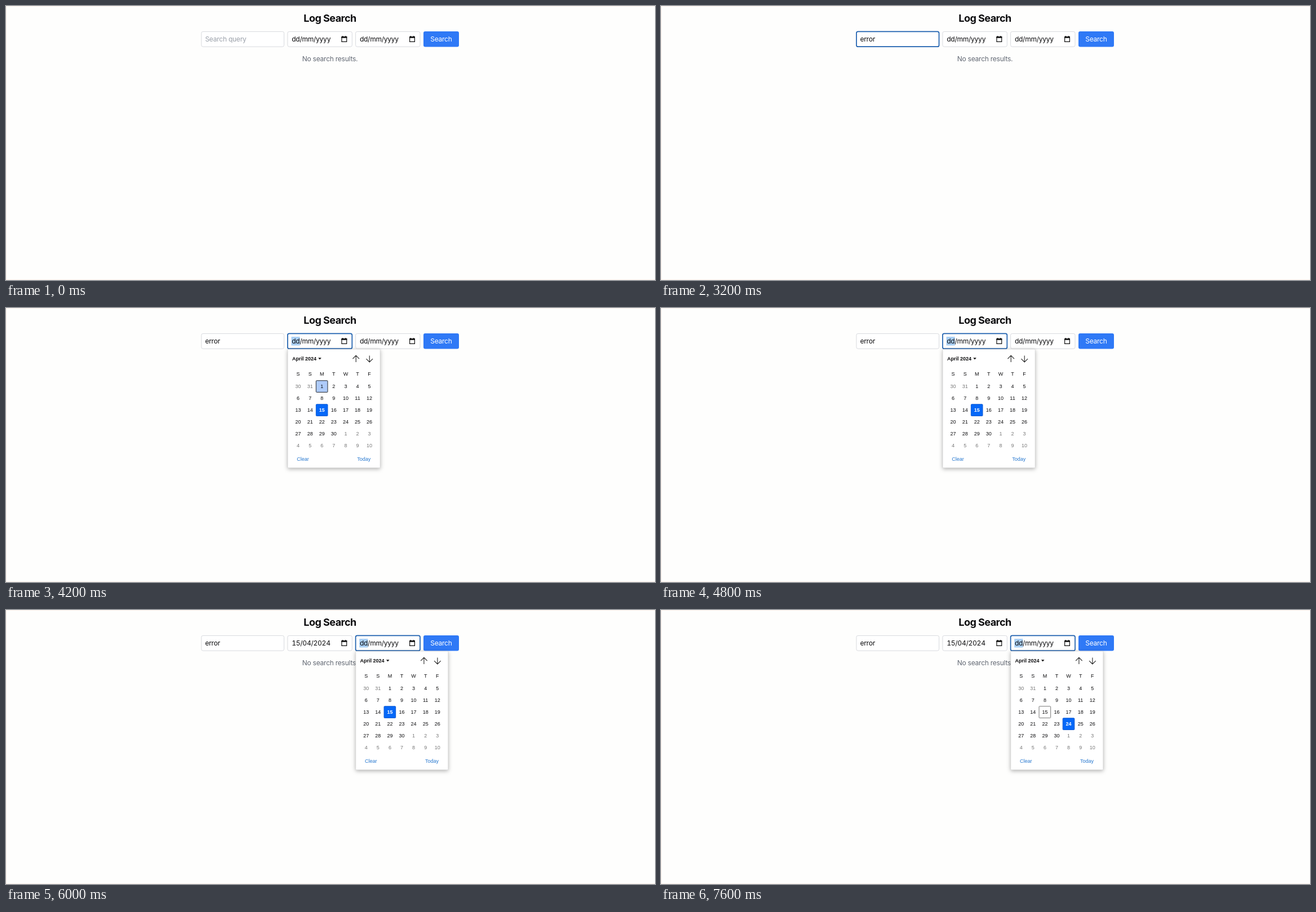
An HTML page for the animation above (8 s loop, 1152 by 486 pixels).

```html
<!DOCTYPE html>
<html lang="en">
<head>
<meta charset="utf-8">
<title>Log Search</title>
<style>
  html, body { margin: 0; width: 100%; height: 100%; overflow: hidden; background: #fefefd; }
  svg { display: block; width: 1152px; height: 486px; }
  text { font: 12px Inter, sans-serif; letter-spacing: -.02em; fill: #0c0c0e; white-space: pre; }
  .title { font-size: 18px; font-weight: 700; letter-spacing: -.03em; }
  .mid { text-anchor: middle; }
  .hint { fill: #9ba1aa; }
  .note { fill: #626873; }
  .on-blue { fill: #fff; }
  .date { font-variant-numeric: tabular-nums; }
  .box { fill: #fff; stroke: #d8dadf; }
  .focus { stroke: #1c5fae; stroke-width: 1.7; }
  .mark { fill: #a9cff5; }
  .popup { fill: #fff; stroke: #cfcfcf; stroke-width: .6; filter: drop-shadow(0 2px 3.5px rgba(0, 0, 0, .3)); }
  .cal text { font: 9px "Liberation Sans", Arial, sans-serif; letter-spacing: 0; stroke: currentColor; stroke-width: 0; }
  .cal .bold { font-weight: 700; }
  .cal .out { fill: #777; }
  .cal .link { fill: #2577cf; }
  .cal .on-blue { fill: #fff; font-weight: 700; }
  .line { fill: none; stroke: #222; stroke-width: 1.1; }
  .hover { fill: #aecbfa; stroke: #23262b; }
  .picked { fill: #0668f8; stroke: #0b57d0; }
  .today { fill: #fff; stroke: #777; }
</style>
</head>
<body>
<svg id="stage" viewBox="0 0 1152 486"></svg>
<script>
const LOOP = 8000;
const DATE_X = [499.9, 620.6];
const BLANK = 'dd/mm/yyyy';
const TODAY = 15;

// Each step changes part of the state from its time on.
const steps = [
  [0, { query: '', caret: false, focus: '', first: BLANK, open: false, hover: 0, picked: TODAY }],
  [1400, { focus: 'query', caret: true }],
  [2000, { query: 'e' }],
  [2600, { query: 'err' }],
  [3000, { query: 'erro' }],
  [3200, { query: 'error', caret: false }],
  [3800, { focus: 'first' }],
  [4200, { open: true, hover: 1 }],
  [4600, { hover: 0 }],
  [5000, { open: false, first: '15/04/2024' }],
  [6000, { open: true, focus: 'second' }],
  [7000, { hover: 10 }],
  [7200, { hover: 17 }],
  [7400, { hover: 24 }],
  [7600, { hover: 0, picked: 24 }]
];

const stage = document.getElementById('stage');

const text = (x, y, str, cls = '') => `<text x="${x}" y="${y}" class="${cls}">${str}</text>`;
const rect = (x, y, w, h, cls, r = 0) =>
  `<rect x="${x}" y="${y}" width="${w}" height="${h}" rx="${r}" class="${cls}"/>`;
const path = (d, attrs = 'class="line"') => `<path d="${d}" ${attrs}/>`;

const field = (x, w, focused) => rect(x, 45.4, w, 26.8, focused ? 'box focus' : 'box', 2.8);

function dateField(x, value, focused) {
  return field(x, 114.4, focused)
    + (focused ? rect(x + 6.6, 51, 15.2, 15.5, 'mark') : '')
    + text(x + 7.3, 63.2, value, 'date')
    + `<g transform="translate(${x + 95.4} 53)">`
    + path('M.6 1.9h8.8v8.5H.6z', 'fill="none" stroke="#111" stroke-width="1.2"')
    + path('M0 1.3h10v2.4H0zM1.6 0h1.5v2H1.6zM6.9 0h1.5v2H6.9z', 'fill="#111"')
    + '</g>';
}

function dayCell(i, hover, picked) {
  const n = i - 1;
  const day = n < 1 ? n + 31 : n > 30 ? n - 30 : n;
  const inside = n === day;
  const x = 18.7 + (i % 7) * 21.08;
  const y = 66 + Math.floor(i / 7) * 21;
  const is = d => inside && day === d;
  const frame = is(picked) ? 'picked' : is(hover) ? 'hover' : is(TODAY) ? 'today' : '';
  const cls = is(picked) ? 'on-blue' : inside ? '' : 'out';
  return (frame ? rect(x - 10.4, y - 10.2, 20.6, 20.6, frame, 1) : '')
    + text(x, y + 3.2, day, 'mid ' + cls);
}

function calendar(x, hover, picked) {
  let out = `<g class="cal" transform="translate(${x} 73)">`
    + rect(.2, 0, 164, 210.4, 'popup', 1)
    + text(8, 19.7, 'April 2024', 'bold')
    + path('M54.3 15.2h5.6l-2.8 3.2z', 'fill="#111"')
    + path('M121.3 23V11.5M115.5 17.2l5.8-5.8 5.8 5.8')
    + path('M145.3 11.5V23M139.5 17.2l5.8 5.8 5.8-5.8');
  [...'SSMTWTF'].forEach((d, i) => out += text(18.7 + i * 21.08, 47.3, d, 'mid'));
  // The grid starts two days before the first of the month.
  for (let i = 0; i < 42; i++) out += dayCell(i, hover, picked);
  return out + text(16.4, 197.8, 'Clear', 'link') + text(123.3, 197.8, 'Today', 'link') + '</g>';
}

function draw(s) {
  const second = s.focus === 'second';
  stage.innerHTML = path('M.5 486V.5H1152M0 485.5H1152', 'fill="none" stroke="#fdf2ea"')
    + text(575, 27.7, 'Log Search', 'title mid')
    + field(346.9, 146.6, s.focus === 'query')
    + text(353.4, 63.2, s.query || 'Search query', s.query ? 'query' : 'hint')
    + dateField(DATE_X[0], s.first, s.focus === 'first')
    + dateField(DATE_X[1], BLANK, second)
    + `<rect x="741" y="45" width="63" height="27.4" rx="3" fill="#2f79f6"/>`
    + text(772.4, 63.2, 'Search', 'mid on-blue')
    + text(575, 97.8, 'No search results.', 'mid note')
    + (s.open ? calendar(DATE_X[second ? 1 : 0], s.hover, s.picked) : '');
  if (s.caret) {
    const typed = stage.querySelector('.query');
    const x = 353.3 + (typed ? typed.getComputedTextLength() : 0);
    stage.insertAdjacentHTML('beforeend', `<rect x="${x}" y="51.5" width="1" height="14.5" fill="#111"/>`);
  }
}

let shown = -1;
const start = performance.now();

function tick() {
  const t = Math.max(0, performance.now() - start) % LOOP;
  const now = steps.filter(([at]) => at <= t);
  if (now.length !== shown) {
    shown = now.length;
    draw(Object.assign({}, ...now.map(step => step[1])));
  }
  requestAnimationFrame(tick);
}
tick();
</script>
</body>
</html>
```
